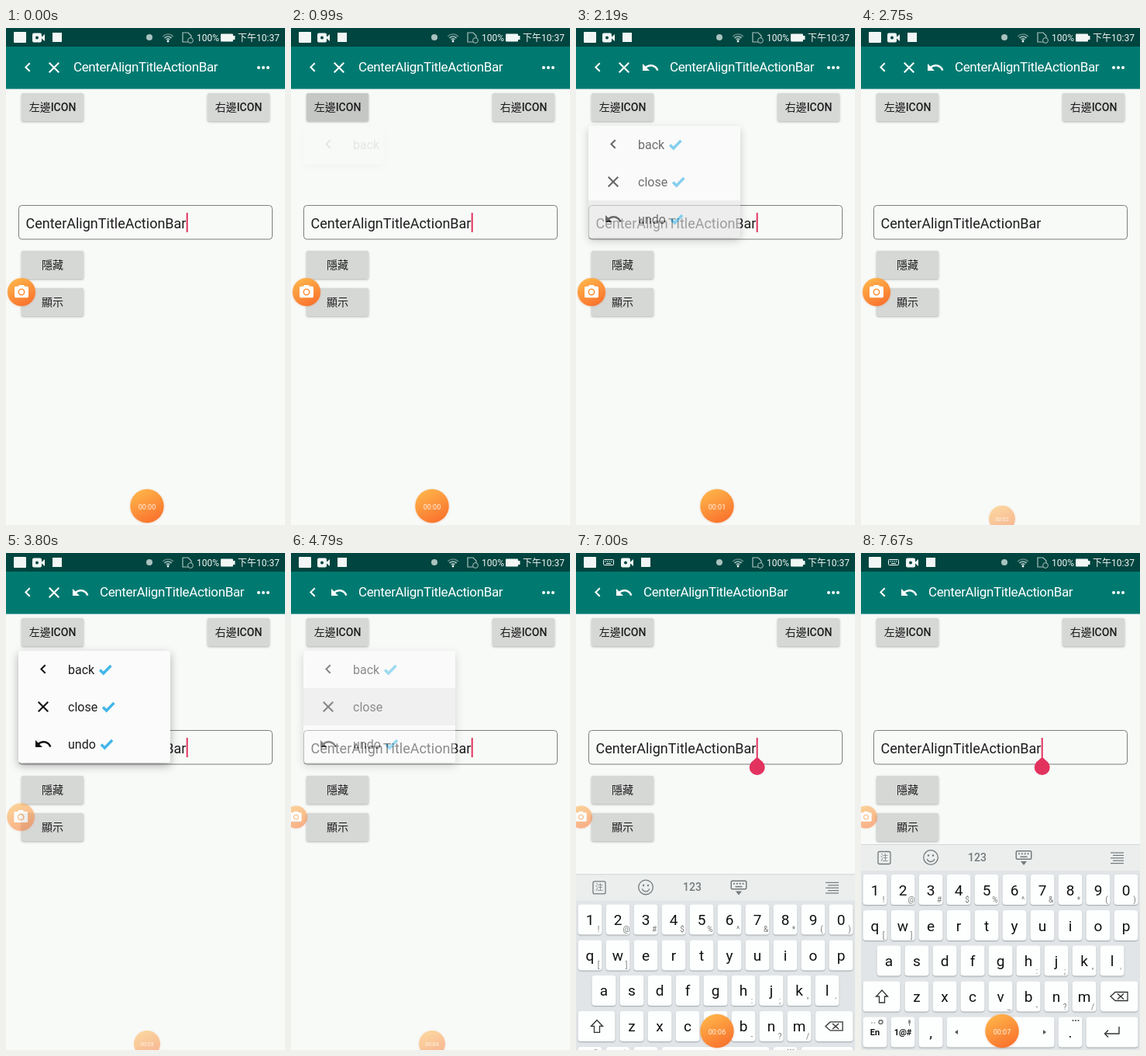
Animation of 360x640 px, one loop 8000 ms. Source, as an HTML page with a canvas:

```html
<!DOCTYPE html>
<html lang="zh-TW">
<head>
<meta charset="utf-8">
<title>Action bar demo</title>
<style>
html, body { margin: 0; width: 100%; height: 100%; overflow: hidden; background: #f8faf8; }
canvas { display: block; width: 360px; height: 640px; }
</style>
</head>
<body>
<canvas id="stage"></canvas>
<script>
const LOOP = 8000;
const TITLE = 'CenterAlignTitleActionBar';
const PAPER = '#f8faf8', INK = '#1d1d1d', ORANGE = '#fa6b0c', PINK = '#e2335f';
const dpr = window.devicePixelRatio || 1;

function surface(canvas) {
  canvas.width = 360 * dpr;
  canvas.height = 640 * dpr;
  return canvas.getContext('2d');
}
const screen2d = surface(document.getElementById('stage'));
const layer2d = surface(document.createElement('canvas'));
let ctx = screen2d;

const BACK = new Path2D('M15.41 16.09l-4.58-4.59 4.58-4.59L14 5.5l-6 6 6 6z');
const UNDO = new Path2D('M12.5 8c-2.65 0-5.05.99-6.9 2.6L2 7v9h9l-3.62-3.62c1.39-1.16 3.16-1.88 5.12-1.88 3.54 0 6.55 2.31 7.6 5.5l2.37-.78C21.08 11.03 17.15 8 12.5 8z');
const CAMERA = new Path2D('M9 2L7.17 4H4c-1.1 0-2 .9-2 2v12c0 1.1.9 2 2 2h16c1.1 0 2-.9 2-2V6c0-1.1-.9-2-2-2h-3.17L15 2H9zm3 15c-2.76 0-5-2.24-5-5s2.24-5 5-5 5 2.24 5 5-2.24 5-5 5z');

// Timing helpers
const ramp = (t, a, b) => Math.max(0, Math.min(1, (t - a) / (b - a)));
const ease = (t, a, b) => { const p = ramp(t, a, b); return p * p * (3 - 2 * p); };
const mix = (a, b, p) => a + (b - a) * p;
const within = (t, spans) => spans.some(([a, b]) => t >= a && t < b);

// Fades everything drawn inside as one flat picture
function faded(alpha, draw) {
  if (alpha <= 0) return;
  if (alpha >= 1) return draw();
  layer2d.setTransform(dpr, 0, 0, dpr, 0, 0);
  layer2d.clearRect(0, 0, 360, 640);
  ctx = layer2d;
  draw();
  ctx = screen2d;
  ctx.globalAlpha = alpha;
  ctx.drawImage(layer2d.canvas, 0, 0, 360, 640);
  ctx.globalAlpha = 1;
}

// Drawing helpers
function at(x, y, scale, draw) {
  ctx.save();
  ctx.translate(x, y);
  ctx.scale(scale, scale);
  draw();
  ctx.restore();
}

function text(str, x, y, size, color, { weight = 400, align = 'left', spacing = 0 } = {}) {
  ctx.font = `${weight} ${size}px Roboto, "Noto Sans CJK TC", "Noto Sans CJK", sans-serif`;
  ctx.letterSpacing = spacing + 'px';
  ctx.textAlign = align;
  ctx.fillStyle = color;
  ctx.fillText(str, x, Math.round(y + size * 0.355));
  const width = ctx.measureText(str).width;
  ctx.letterSpacing = '0px';
  return width;
}

function box(x, y, w, h, r, fill, stroke, width = 1) {
  ctx.beginPath();
  ctx.roundRect(x, y, w, h, r);
  if (fill) { ctx.fillStyle = fill; ctx.fill(); }
  if (stroke) { ctx.strokeStyle = stroke; ctx.lineWidth = width; ctx.stroke(); }
}

function disc(x, y, r, fill, stroke, width = 1) {
  box(x - r, y - r, 2 * r, 2 * r, r, fill, stroke, width);
}

function line(points, color, width) {
  ctx.beginPath();
  points.forEach(([x, y]) => ctx.lineTo(x, y));
  ctx.strokeStyle = color;
  ctx.lineWidth = width;
  ctx.stroke();
}

function shape(points, color) {
  ctx.beginPath();
  points.forEach(([x, y]) => ctx.lineTo(x, y));
  ctx.fillStyle = color;
  ctx.fill();
}

function shadowed(color, blur, dy, draw) {
  ctx.save();
  ctx.shadowColor = color;
  ctx.shadowBlur = blur * dpr;
  ctx.shadowOffsetY = dy * dpr;
  draw();
  ctx.restore();
}

function glyph(path, x, y, scale, color) {
  at(x, y, scale, () => {
    ctx.translate(-12, -12);
    ctx.fillStyle = color;
    ctx.fill(path, 'evenodd');
  });
}

const icons = {
  back: (x, y, c) => glyph(BACK, x, y, 1, c),
  close: (x, y, c) => {
    line([[x - 6.3, y - 6.3], [x + 6.3, y + 6.3]], c, 2);
    line([[x + 6.3, y - 6.3], [x - 6.3, y + 6.3]], c, 2);
  },
  undo: (x, y, c) => glyph(UNDO, x, y, 1, c)
};

function keyboardGlyph(x, y, c) {
  box(x - 6.5, y - 3.5, 13, 7, 1, null, c, 1);
  for (let i = 0; i < 4; i++) {
    ctx.fillStyle = c;
    ctx.fillRect(x - 4.7 + i * 2.6, y - 1.7, 1.3, 1.2);
  }
  ctx.fillRect(x - 3, y + 1, 6, 1);
}

function statusBar(typing) {
  ctx.fillStyle = '#00453f';
  ctx.fillRect(0, 0, 360, 24);
  const c = '#f2f7f6', dim = '#a9c2bf';
  box(10, 5, 16, 14, 1, c);
  if (typing) keyboardGlyph(42, 12, c);
  const x = typing ? 66 : 42;
  box(x - 8, 6.5, 12, 12, 2, c);
  shape([[x + 3, 12.5], [x + 8, 8], [x + 8, 17]], c);
  disc(x - 2, 12.5, 2, '#00453f');
  box(x + 18, 6, 12, 12, 0, c);
  disc(185, 12, 4, dim);
  [3, 6, 9].forEach(r => {
    ctx.beginPath();
    ctx.arc(209, 17, r, -Math.PI * 0.77, -Math.PI * 0.23);
    ctx.strokeStyle = r > 6 ? '#5f8783' : dim;
    ctx.lineWidth = 1.7;
    ctx.stroke();
  });
  disc(209, 17, 1.4, c);
  line([[228, 6], [235, 6], [239, 10], [239, 18], [228, 18], [228, 5.5]], dim, 1.2);
  disc(238, 16, 3.4, '#00453f', dim, 1);
  text('100%', 246, 12.5, 12, c);
  box(277, 7.5, 16, 10, 1, c);
  ctx.fillRect(293, 10, 2.5, 5);
  text('下午10:37', 299, 12.5, 12, c);
}

function actionBar(shown) {
  ctx.fillStyle = '#007a71';
  ctx.fillRect(0, 24, 360, 54.5);
  shown.forEach((name, i) => icons[name](28 + 34 * i, 51, '#fff'));
  text(TITLE, 19 + 34 * shown.length, 50, 17, '#fff', { spacing: -0.37 });
  [326, 332, 338].forEach(x => disc(x, 51, 2, '#fff'));
}

function button(label, x, y, press = 0) {
  shadowed('rgba(0,0,0,.3)', 3, 1, () => box(x, y, 80, 36, 2, '#d6d8d6'));
  if (press) box(x, y, 80, 36, 2, `rgba(0,0,0,${0.08 * press})`);
  text(label, x + 40, y + 18.5, 14, INK, { weight: 500, align: 'center' });
}

function editor(cursor) {
  box(16.5, 228.5, 327, 43.5, 4, PAPER, '#7c7f7c');
  text(TITLE, 25.5, 251.5, 18, INK);
  if (cursor) {
    ctx.fillStyle = PINK;
    ctx.fillRect(232.7, 238, 2, 25);
  }
}

function cursorHandle() {
  disc(233.7, 276, 10, PINK);
  shape([[233.7, 262.5], [241.5, 270], [233.7, 276], [226, 270]], PINK);
}

function menu(shown, open, alpha, pressed, press) {
  if (!open) return;
  faded(alpha * Math.min(1, open * 1.4), () => {
    ctx.save();
    const h = 144 * mix(0.3, 1, open), w = 196 * mix(0.5, 1, open);
    shadowed('rgba(0,0,0,.3)', 12, 4, () => box(16, 126, w, h, 2, '#fafbfa'));
    ctx.beginPath();
    ctx.rect(16, 126, w, h);
    ctx.clip();
    ['back', 'close', 'undo'].forEach((name, i) => {
      const y = 150 + 48 * i;
      if (name === pressed && press) {
        ctx.fillStyle = `rgba(0,0,0,${0.08 * press})`;
        ctx.fillRect(16, y - 24, 196, 48);
      }
      icons[name](48, y, '#111');
      const x = 86 + text(name, 80, y + 0.5, 16, INK);
      if (shown.includes(name)) line([[x + 1, y + 0.5], [x + 5.5, y + 5], [x + 15.3, y - 5]], '#42b6e9', 3.4);
    });
    ctx.restore();
  });
}

function orangeBall(r) {
  const g = ctx.createLinearGradient(-r * 0.5, -r, r * 0.5, r);
  g.addColorStop(0, '#ffb54a');
  g.addColorStop(1, '#f9702c');
  shadowed('rgba(200,90,30,.3)', 3, 0.5, () => disc(0, 0, r, g));
}

function cameraBall(t) {
  const slide = ease(t, 3720, 4260);
  faded(mix(1, 0.55, ramp(t, 3680, 3800)), () => {
    at(mix(20, 6.5, slide), 340, mix(1, 0.8, slide), () => {
      orangeBall(18);
      glyph(CAMERA, 0, 0, 0.9, '#fff');
      disc(0, 0, 2.9, '#fff');
    });
  });
}

function timerBall(t) {
  const sunk = ease(t, 2380, 2600) * (1 - ease(t, 5680, 5800));
  const seconds = Math.max(0, Math.floor((t - 480) / 1000));
  faded(mix(1, 0.5, sunk), () => {
    at(182, mix(615.5, 632, sunk), mix(1, 0.78, sunk), () => {
      orangeBall(21.7);
      text('00:0' + seconds, 0, 0.5, 9, '#fff3e6', { align: 'center' });
    });
  });
}

function recorderPanel(p) {
  const bubble = (x, y, draw) => at(mix(182, x, p), mix(616, y, p), mix(0.4, 1, p), () => {
    shadowed('rgba(0,0,0,.25)', 5, 1.5, () => disc(0, 0, 20, '#fdfdfd'));
    draw();
  });
  faded(p, () => {
    bubble(182, 550, () => box(-7.5, -7.5, 15, 15, 0.5, ORANGE));
    bubble(135, 584, () => [-7.5, 2.5].forEach(x => box(x, -7.5, 5, 15, 0.5, ORANGE)));
    bubble(231, 584, () => {
      box(-3.5, -8.5, 7, 5, 1, null, ORANGE, 2);
      box(-9.5, -5.5, 19, 14.5, 2, ORANGE);
      disc(0, 1.5, 5.2, '#fff');
      disc(-1.2, 0.3, 2.6, ORANGE);
      line([[-1.2, 0.3], [3.4, 4.9]], ORANGE, 2.2);
      line([[-1.2, 0.3], [-4, -2.5]], '#fff', 1.8);
    });
  });
}

const KEY_ROWS = [
  { keys: '1234567890', hints: '!@#$%^&*()', x: 18, y: 433.5 },
  { keys: 'qwertyuiop', hints: '[]', x: 18, y: 479.5 },
  { keys: 'asdfghjkl', hints: '     :;"\'', x: 36, y: 525 },
  { keys: 'zxcvbnm', hints: '   _-?/', x: 72, y: 571 }
];

function keyCap(x, y, w) {
  shadowed('rgba(60,70,80,.4)', 1.5, 1, () => box(x, y, w, 39, 4, '#fdfefe'));
}

function keyboard(p) {
  if (!p) return;
  ctx.save();
  ctx.translate(0, (1 - p) * 266);
  ctx.fillStyle = '#e1e5e7';
  ctx.fillRect(0, 375, 360, 266);
  ctx.fillStyle = '#eceeee';
  ctx.fillRect(0, 375, 360, 34);
  ctx.fillStyle = '#d3d7d8';
  ctx.fillRect(0, 375, 360, 1);

  const gray = '#747a7c', center = { align: 'center' };
  box(22, 384.5, 16, 16, 2, null, gray, 1.3);
  text('注', 30, 392.5, 10, gray, center);
  disc(90, 392, 9.3, null, gray, 1.3);
  disc(87, 389.5, 1.2, gray);
  disc(93, 389.5, 1.2, gray);
  ctx.beginPath();
  ctx.arc(90, 392.5, 5, 0.3, Math.PI - 0.3);
  ctx.stroke();
  text('123', 150, 392, 14, gray, { align: 'center', weight: 500 });
  at(210, 389, 1.5, () => keyboardGlyph(0, 0, gray));
  shape([[206, 397], [214, 397], [210, 402]], gray);
  for (let i = 0; i < 5; i++) line([[i % 2 ? 325 : 322, 386 + i * 3.4], [339, 386 + i * 3.4]], gray, 1.2);

  for (const row of KEY_ROWS) {
    [...row.keys].forEach((key, i) => {
      const x = row.x + 36 * i;
      keyCap(x - 15.5, row.y - 19.5, 31);
      text(key, x, row.y + 0.5, 19, '#111', center);
      text(row.hints[i] || '', x + 11, row.y + 13, 10, '#777', center);
    });
  }
  [[2.5, 551.5, 48], [309, 551.5, 48.5], [2.5, 597.5, 31], [38.5, 597.5, 31], [74.5, 597.5, 31],
    [110.5, 597.5, 139], [254.5, 597.5, 31], [290.5, 597.5, 67]].forEach(k => keyCap(...k));

  line([[27, 563], [34.5, 571], [30.5, 571], [30.5, 579], [23.5, 579], [23.5, 571], [19.5, 571], [27, 563], [28, 564]], '#333', 1.3);
  line([[322, 571], [328, 565.5], [344, 565.5], [344, 576.5], [328, 576.5], [322, 571], [323, 570]], '#333', 1.3);
  line([[331, 567.5], [339, 574.5]], '#333', 1.4);
  line([[339, 567.5], [331, 574.5]], '#333', 1.4);
  text('En', 18, 617, 11, '#111', { align: 'center', weight: 700 });
  text('1@#', 54, 617, 11, '#111', { align: 'center', weight: 700 });
  [14, 17.5].forEach(x => disc(x, 605, 0.8, '#777'));
  disc(25.5, 604, 2.4, null, '#777', 1.6);
  box(61, 601, 3, 5, 1.5, '#888');
  line([[62.5, 606], [62.5, 609]], '#888', 1);
  text(',', 90, 617, 19, '#111', center);
  text('.', 270, 617, 19, '#111', center);
  [273.5, 277, 280.5].forEach(x => disc(x, 602, 1.1, '#555'));
  shape([[121, 617], [125, 614], [125, 620]], '#555');
  shape([[239, 617], [235, 614], [235, 620]], '#555');
  line([[333, 610], [333, 619], [315, 619]], '#333', 1.4);
  line([[319, 614.5], [314.5, 619], [319, 623.5]], '#333', 1.4);
  ctx.restore();
}

function render(t) {
  const shown = t < 2060 ? ['back', 'close'] : t < 4630 ? ['back', 'close', 'undo'] : ['back', 'undo'];
  const cursorOn = !within(t, [[60, 490], [2560, 3060], [5120, 5620], [6130, 6620], [7120, 7630]]);
  const buttonPress = ramp(t, 790, 870) * (1 - ramp(t, 1000, 1300)) + ramp(t, 3180, 3260) * (1 - ramp(t, 3380, 3680));

  ctx.setTransform(dpr, 0, 0, dpr, 0, 0);
  ctx.fillStyle = PAPER;
  ctx.fillRect(0, 0, 360, 640);
  button('左邊ICON', 20, 84, buttonPress);
  button('右邊ICON', 260, 84);
  button('隱藏', 20, 287);
  button('顯示', 20, 335);
  editor(cursorOn);
  if (t >= 6640) cursorHandle();
  actionBar(shown);
  statusBar(t >= 6800);

  if (t < 2500) menu(shown, ease(t, 950, 1230), 1 - ramp(t, 2080, 2380), 'undo', ramp(t, 1690, 1850));
  else menu(shown, ease(t, 3330, 3610), 1 - ramp(t, 4640, 4940), 'close', ramp(t, 4440, 4560));

  keyboard(ease(t, 6750, 7080));
  cameraBall(t);
  recorderPanel(ease(t, 5740, 5920) * (1 - ease(t, 6420, 6580)));
  timerBall(t);
  if (within(t, [[6350, 6450]])) disc(207, 454.5, 11, 'rgba(255,255,255,.7)', '#cfd0ec', 1.6);
}

function tick() {
  render(performance.now() % LOOP);
  requestAnimationFrame(tick);
}
tick();
</script>
</body>
</html>
```
